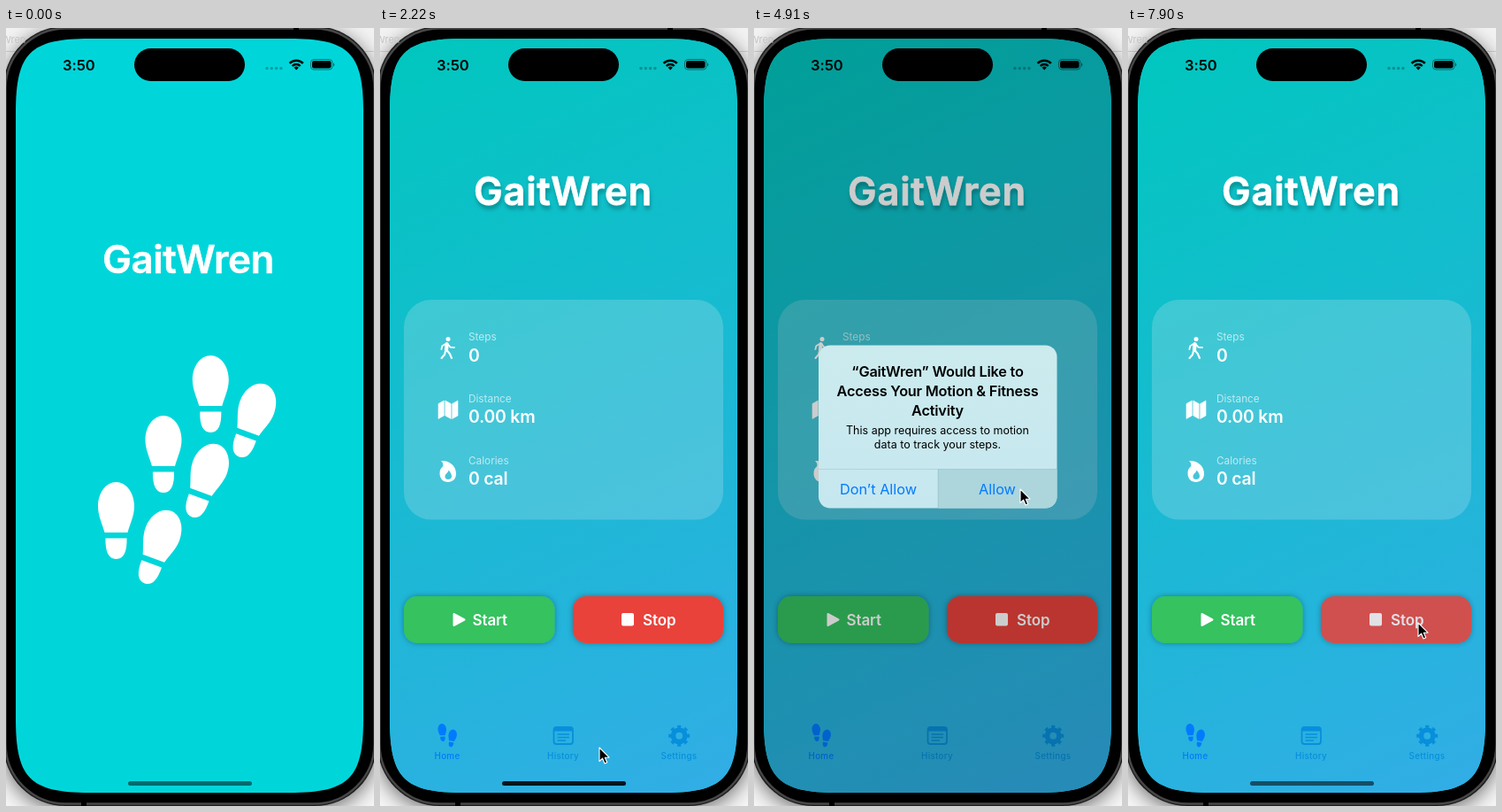
Animation of 416x879 px, one loop 8000 ms. Source, as an HTML page:

```html
<!DOCTYPE html>
<html lang="en">
<head>
<meta charset="utf-8">
<title>Step tracker</title>
<style>
  html, body { margin: 0; width: 100%; height: 100%; overflow: hidden; background: #ececec; }
  svg { display: block; width: 100vw; height: 100vh; }
  text { font-family: Inter, "Open Sans", sans-serif; }
  .mid { text-anchor: middle; }
  .brand { fill: #fff; font-weight: 600; }
  .label { font-size: 11.8px; fill-opacity: .65; }
  .value { font-size: 19.4px; font-weight: 600; letter-spacing: -.2px; }
  .action { font-size: 17px; font-weight: 600; letter-spacing: -.1px; }
  .tab { font-size: 9.8px; font-weight: 500; letter-spacing: .3px; text-anchor: middle; }
  .ask { font-size: 16.3px; font-weight: 600; letter-spacing: -.2px; }
  .note { font-size: 12.5px; }
  .choice { font-size: 16.3px; fill: #007aff; }

  /* 1% of the loop = 80 ms */
  .home, .bar, .dim, .alert, .hit, .start, .stop, .cursor {
    animation: 8s step-end infinite;
  }
  .home { animation-name: home; }
  .bar { animation-name: bar; }
  .dim { animation-name: dim; }
  .alert { animation-name: alert; transform-origin: 207.5px 450.5px; }
  .hit { animation-name: hit; }
  .start { animation-name: start; }
  .stop { animation-name: stop; }
  .cursor { animation-name: cursor; }

  @keyframes home {
    0% { opacity: 0; }
    14.875% { opacity: .32; }
    16.75% { opacity: .79; }
    18.625% { opacity: .96; }
    20.375%, 100% { opacity: 1; }
  }
  @keyframes bar {
    0% { opacity: .5; }
    14.875% { opacity: .7; }
    16.75% { opacity: .88; }
    37.125% { opacity: .6; }
    39% { opacity: .42; }
    48.375% { opacity: .3; }
    50.25% { opacity: 0; }
    63.25% { opacity: .25; }
    65.125% { opacity: .45; }
    67%, 100% { opacity: .55; }
  }
  @keyframes dim {
    0%, 67%, 100% { opacity: 0; }
    50.25% { opacity: .5; }
    52.125% { opacity: 1; }
    63.25% { opacity: .5; }
    65.125% { opacity: .1; }
  }
  @keyframes alert {
    0%, 67%, 100% { opacity: 0; transform: none; }
    50.25% { opacity: .6; transform: scale(1.08); }
    52.125% { opacity: 1; transform: none; }
    63.25% { opacity: .5; }
    65.125% { opacity: .1; }
  }
  @keyframes hit {
    0%, 67%, 100% { opacity: 0; }
    61.375% { opacity: 1; }
  }
  @keyframes start {
    0%, 50.25%, 100% { opacity: 1; }
    46.5% { opacity: .8; }
    48.375% { opacity: .7; }
  }
  @keyframes stop {
    0% { opacity: 1; }
    98.75%, 100% { opacity: .88; }
  }
  @keyframes cursor {
    0% { transform: translate(316px, 664px); visibility: hidden; }
    24.125% { transform: translate(316px, 664px); visibility: visible; }
    26% { transform: translate(276px, 758px); }
    27.75% { transform: translate(248px, 813px); }
    35.25% { transform: translate(241px, 804px); }
    37.125% { transform: translate(208px, 763px); }
    39% { transform: translate(167px, 712px); }
    40.875% { transform: translate(143px, 682px); }
    42.75% { transform: translate(135px, 672px); }
    44.625% { transform: translate(134px, 671px); }
    54% { transform: translate(150px, 657px); }
    55.75% { transform: translate(207px, 605px); }
    57.625% { transform: translate(271px, 547px); }
    59.5% { transform: translate(299px, 523px); }
    61.375% { transform: translate(301px, 521px); }
    85.75% { transform: translate(302px, 526px); }
    87.625% { transform: translate(306px, 548px); }
    89.5% { transform: translate(314px, 592px); }
    91.375% { transform: translate(322px, 637px); }
    93.25% { transform: translate(327px, 663px); }
    95%, 100% { transform: translate(328px, 672px); visibility: visible; }
  }
</style>
</head>
<body>
<svg viewBox="0 0 416 879" preserveAspectRatio="none">
  <defs>
    <linearGradient id="sky" gradientUnits="userSpaceOnUse" x1="11" y1="12" x2="404" y2="864">
      <stop offset="0" stop-color="#00c7be"/>
      <stop offset="1" stop-color="#32ade6"/>
    </linearGradient>
    <linearGradient id="glass" x2="0" y2="1">
      <stop offset="0" stop-color="#cbebee"/>
      <stop offset="1" stop-color="#c6e7ef"/>
    </linearGradient>
    <clipPath id="screen">
      <path d="M11 96c0-68 16-84 84-84h225c68 0 84 16 84 84v684c0 68-16 84-84 84H95c-68 0-84-16-84-84z"/>
    </clipPath>
    <filter id="edge" x="-10%" y="-10%" width="120%" height="120%">
      <feDropShadow dx="0" dy="5" stdDeviation="11" flood-opacity=".55"/>
    </filter>
    <filter id="lift" x="-10%" y="-30%" width="120%" height="160%">
      <feDropShadow dx="0" dy="0" stdDeviation="3.2" flood-opacity=".32"/>
    </filter>
    <filter id="cast" x="-10%" y="-30%" width="120%" height="170%">
      <feDropShadow dx="1" dy="4.5" stdDeviation="2.2" flood-opacity=".25"/>
    </filter>
    <!-- one shoe print, centred on its own middle -->
    <g id="print">
      <path d="M-13 13.5C-15.5 4-20.5-5-20.5-16C-20.5-32-11-43.5 0-43.5S20.5-32 20.5-16C20.5-5 15.5 4 13 13.5Z"/>
      <path d="M-12 20H12C12.5 35 8.5 43.5 0 43.5S-12.5 35-12 20Z"/>
    </g>
    <g id="pair">
      <use href="#print"/>
      <use href="#print" transform="translate(47 30) rotate(20)"/>
    </g>
  </defs>

  <!-- window behind the phone -->
  <rect width="416" height="879" fill="#f6f6f6"/>
  <rect width="416" height="26" fill="#f3f3f3"/>
  <path d="M0 26.5H416" stroke="#d4d4d4"/>

  <!-- phone body -->
  <rect x="-3" y="-2" width="422" height="881" rx="70" fill="#1c1c1c" filter="url(#edge)"/>
  <text x="-5" y="17" font-size="11" fill="#c4c4c4" clip-path="inset(0 0 0 0)">Wren</text>
  <rect x="-.5" y=".5" width="417" height="876" rx="68" fill="#000" stroke="#474747" stroke-width="2.4"/>
  <path d="M325 0h6v2h-6zM85 874h6v5h-6z"/>

  <g clip-path="url(#screen)">
    <!-- splash -->
    <rect x="11" y="12" width="393" height="852" fill="#00d6da"/>
    <text class="brand mid" x="206" y="277" font-size="44" letter-spacing="-.5" stroke="#fff" stroke-width=".5">GaitWren</text>
    <g fill="#fff">
      <use href="#pair" x="231.3" y="413.5"/>
      <use href="#pair" x="178" y="481.5"/>
      <use href="#pair" x="124.5" y="556.5"/>
    </g>

    <!-- home -->
    <g class="home">
      <rect x="11" y="12" width="393" height="852" fill="url(#sky)"/>
      <text class="brand mid" x="207" y="200" font-size="43.5" letter-spacing=".8" stroke="#fff" stroke-width=".8"
            stroke-linejoin="round" filter="url(#cast)">GaitWren</text>

      <rect x="27" y="307" width="361" height="248.5" rx="31" fill="#f4f0f4" fill-opacity=".2"/>
      <g fill="#fff">
        <circle cx="77" cy="351.4" r="2.5"/>
        <g fill="none" stroke="#fff" stroke-width="2.1" stroke-linecap="round" stroke-linejoin="round">
          <path d="M75.6 357.2L75 363.5" stroke-width="4.2"/>
          <path d="M75.5 364L78.8 368L81 373M74.3 364L73 369L69.5 373"/>
          <path d="M76.5 357L79.5 360.6L84 361M74 357L70.3 359.3L69.4 363" stroke-width="1.8"/>
        </g>
        <path d="M66 424.5L72.3 421V438L66 441.5ZM73.8 421L80.2 424.5V441.5L73.8 438ZM81.7 424.5L88 421V438L81.7 441.5Z"
              stroke="#fff" stroke-width=".6" stroke-linejoin="round"/>
        <path fill-rule="evenodd" d="M69 489C79 488.5 86 495 86 503.5C86 509.5 82 513 77 513C71 513 67.5 509 67.5 503C67.5 499 69 497 71 495.5C72 493 71 491 69 489ZM77.5 499.5C77 503 73.5 503.5 73.5 507C73.5 509 75 510 77 510C79.5 510 81 508.5 81 506.5C81 504 79.5 502 77.5 499.5Z"/>
        <text class="label" x="100" y="353">Steps</text>
        <text class="value" x="100" y="377">0</text>
        <text class="label" x="100" y="423">Distance</text>
        <text class="value" x="100" y="446">0.00 km</text>
        <text class="label" x="100" y="492.5">Calories</text>
        <text class="value" x="100" y="516">0 cal</text>
      </g>

      <g class="start">
        <rect x="27" y="642" width="170.5" height="53" rx="15" fill="#34c25f" filter="url(#lift)"/>
        <g class="start" fill="#fff">
          <path d="M83.5 662V675L95.5 668.5Z" stroke="#fff" stroke-width="2" stroke-linejoin="round"/>
          <text class="action" x="104.5" y="674.5">Start</text>
        </g>
      </g>
      <g class="stop">
        <rect x="218" y="642" width="170" height="53" rx="15" fill="#e8433b" filter="url(#lift)"/>
        <g class="stop" fill="#fff">
          <rect x="273" y="661" width="14" height="14.5" rx="2"/>
          <text class="action" x="297" y="674.5">Stop</text>
        </g>
      </g>

      <g fill="#007aff">
        <use href="#print" transform="translate(70.5 796) rotate(-4) scale(.23)"/>
        <use href="#print" transform="translate(81.5 802.5) rotate(10) scale(.23)"/>
        <text class="tab" x="76" y="826">Home</text>
      </g>
      <g fill="#078fdc" stroke="#078fdc">
        <rect x="196.5" y="790" width="21.5" height="19" rx="3" fill="none" stroke-width="1.8"/>
        <path d="M197 792.5H217.5" stroke-width="4"/>
        <path d="M200.5 798H214M200.5 801.5H214M200.5 805H210" stroke-width="1.3"/>
        <g fill="none">
          <circle cx="338.2" cy="799.7" r="6.7" stroke-width="5.6"/>
          <circle cx="338.2" cy="799.7" r="10.3" stroke-width="3.4" pathLength="16" stroke-dasharray="1" stroke-dashoffset=".5"/>
        </g>
        <text class="tab" x="207" y="826" stroke="none">History</text>
        <text class="tab" x="338" y="826" stroke="none">Settings</text>
      </g>
    </g>

    <rect class="dim" x="11" y="12" width="393" height="852" fill="#000" fill-opacity=".2"/>

    <g class="alert">
      <rect x="73" y="358.5" width="269.5" height="184" rx="13" fill="url(#glass)"/>
      <path class="hit" d="M208 498.5H342.5V529.5A13 13 0 0 1 329.5 542.5H208Z" fill="#acd5dc"/>
      <path d="M73 498.5H342.5M208 498.5V542.5" stroke="#000" stroke-opacity=".13" stroke-width=".7"/>
      <g class="mid">
        <text class="ask" x="207.5" y="394">“GaitWren” Would Like to</text>
        <text class="ask" x="207.5" y="416">Access Your Motion &amp; Fitness</text>
        <text class="ask" x="207.5" y="438">Activity</text>
        <text class="note" x="207.5" y="458.5">This app requires access to motion</text>
        <text class="note" x="207.5" y="474.5">data to track your steps.</text>
        <text class="choice" x="140.5" y="527">Don’t Allow</text>
        <text class="choice" x="275" y="527">Allow</text>
      </g>
    </g>
  </g>

  <!-- status bar -->
  <rect x="145" y="23" width="125" height="37" rx="18.5"/>
  <text x="64" y="47.5" font-size="16.6" font-weight="600" letter-spacing="-.1">3:50</text>
  <path d="M295 45.5H312" stroke="#000" stroke-opacity=".25" stroke-width="3.6" stroke-linecap="round" stroke-dasharray="0 5.3"/>
  <path d="M320.6 39.9A10.6 10.6 0 0 1 335.8 39.9M323.7 43A6.3 6.3 0 0 1 332.7 43" fill="none" stroke="#000" stroke-width="2.5"/>
  <path d="M328.2 47.6L325.5 44.8A3.8 3.8 0 0 1 330.9 44.8Z"/>
  <rect x="344.5" y="35.5" width="24.5" height="11.5" rx="3.6" fill="none" stroke="#000" stroke-opacity=".45"/>
  <rect x="346" y="37" width="21.5" height="8.5" rx="2.3"/>
  <path d="M370 39.5a2.2 2.2 0 0 1 0 4z" fill-opacity=".5"/>

  <rect class="bar" x="138" y="851" width="140" height="5" rx="2.5"/>

  <path class="cursor" d="M0 0V15.5L3.6 12.2L6 18L8.7 16.8L6.3 11.2H11Z" stroke="#fff" stroke-width="1.1" stroke-linejoin="round"/>
</svg>
</body>
</html>
```
